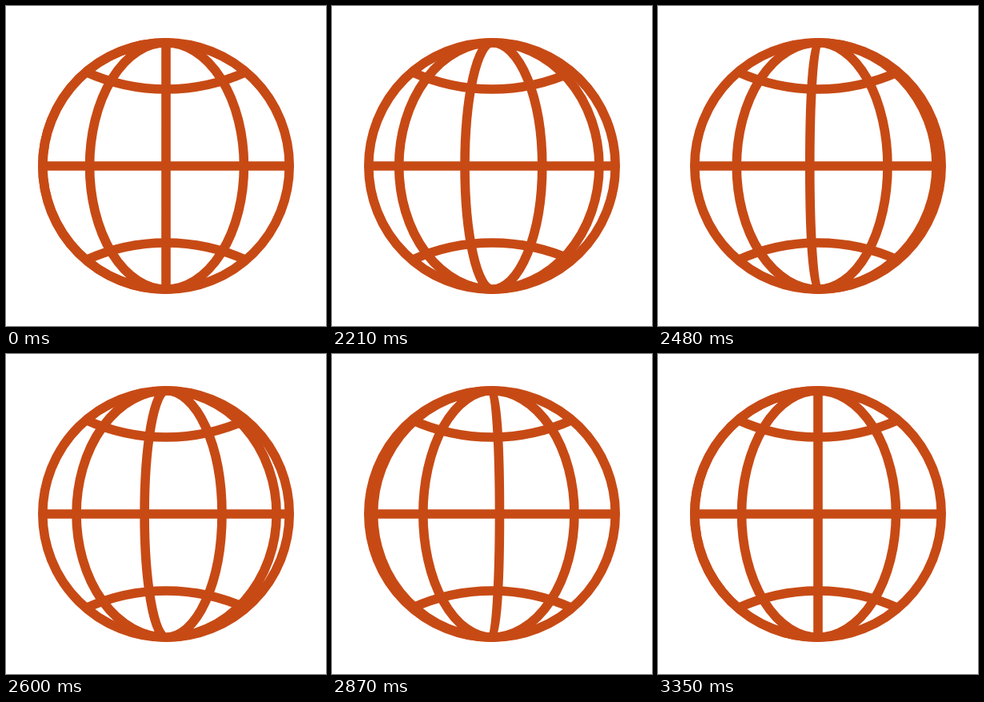
Animation of 400x400 px, one loop 3.44 s. Source, as an HTML page:

```html
<!DOCTYPE html>
<html>
<head>
<meta charset="utf-8">
<title>Spinning globe</title>
<style>
  html, body { margin: 0; width: 100%; height: 100%; overflow: hidden; background: #fff; }
  svg { display: block; width: 100vw; height: 100vh; fill: none; stroke: #c74a15; stroke-width: 11.6; }
</style>
</head>
<body>
<svg viewBox="0 0 400 400">
  <circle cx="200" cy="200" r="154.2"/>
  <path d="M46 200H354M100 82.5A243 243 0 0 0 300 82.5M100 317.5A243 243 0 0 1 300 317.5"/>
  <path id="meridians"/>
</svg>
<script>
const LOOP = 3440, START = 2000, STEP = 30, STEPS = 45, TURNS = 7;
const SLOTS = [-154.2, -95.5, 0, 97.5, 154.2]; // resting x offsets, rim to rim
const meridians = document.getElementById('meridians');

const bezier = (s, a, b) => 3 * (1 - s) ** 2 * s * a + 3 * (1 - s) * s * s * b + s ** 3;

function ease(x) {
  if (x <= 0 || x >= 1) return x <= 0 ? 0 : 1;
  let low = 0, high = 1;
  for (let i = 0; i < 30; i++) {
    const mid = (low + high) / 2;
    if (bezier(mid, 0.167, 0.46) < x) low = mid; else high = mid;
  }
  return bezier(low, 0.167, 1);
}

// Half ellipse from pole to pole
const meridian = x =>
  `M200 45.8A${Math.abs(x)} 154.2 0 0 ${x > 0 ? 1 : 0} 200 354.2`;

function draw(time) {
  const step = Math.floor((time % LOOP - START) / STEP);
  const shift = TURNS * ease(step / STEPS) % 1;
  meridians.setAttribute('d', SLOTS.slice(0, -1)
    .map((x, i) => meridian(x + (SLOTS[i + 1] - x) * shift)).join(''));
}

const begin = performance.now();
function tick() {
  draw(performance.now() - begin);
  requestAnimationFrame(tick);
}
tick();
</script>
</body>
</html>
```
